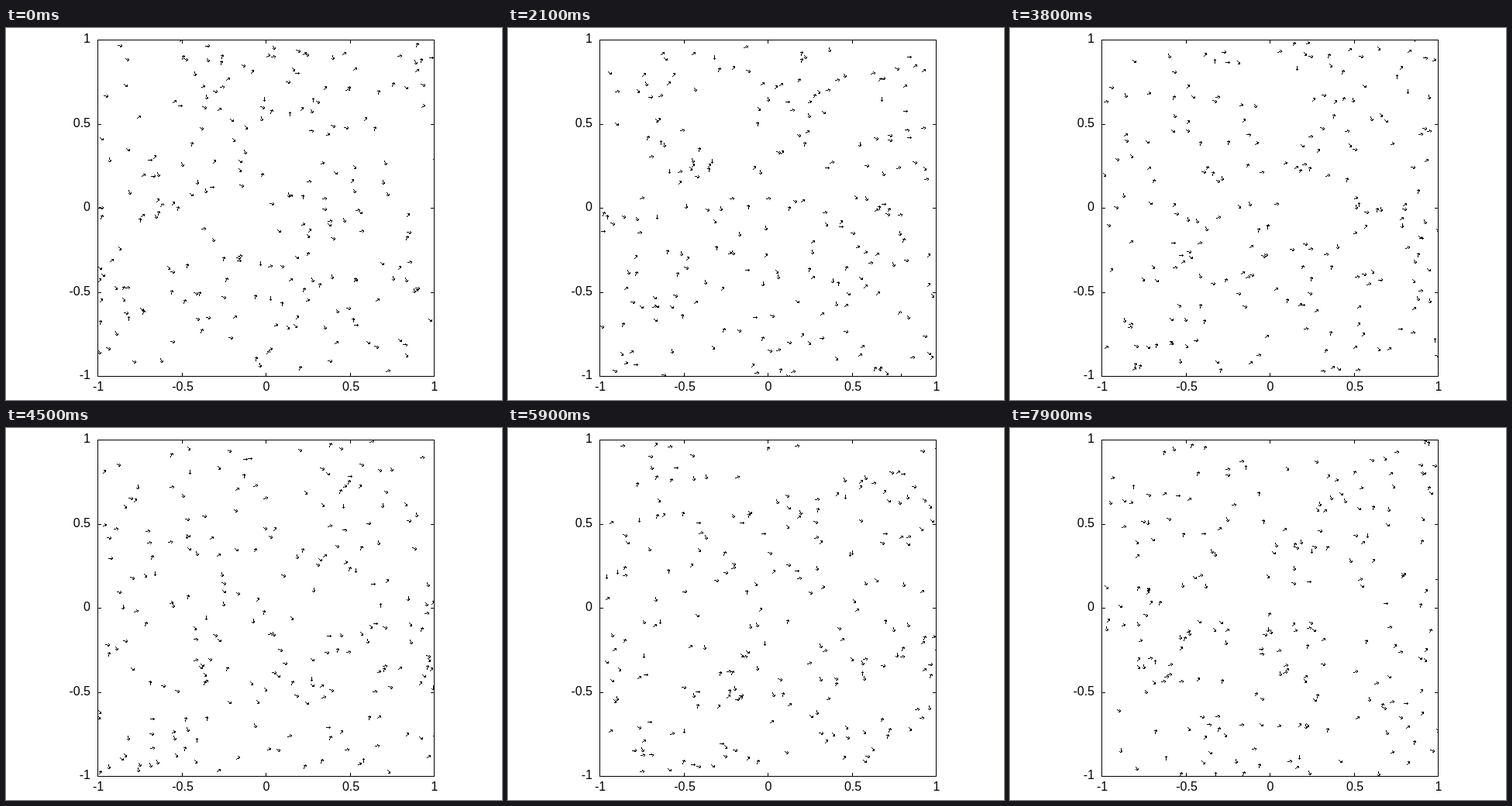
Animation, 640 px wide and 480 px high, one loop 8000 ms. Source, as an HTML page:

```html
<!DOCTYPE html>
<html lang="en">
<head>
<meta charset="utf-8">
<title>Moving particles</title>
<style>
  html, body { margin: 0; width: 100%; height: 100%; overflow: hidden; background: #fff; }
  svg { display: block; }
  path { shape-rendering: crispEdges; }
  #axes { fill: none; stroke: #000; }
  text { font: 16px "Liberation Sans", Arial, sans-serif; }
</style>
</head>
<body>
<svg width="640" height="480" viewBox="0 0 640 480">
  <clipPath id="plot"><rect x="118" y="15" width="435" height="435"/></clipPath>
  <path id="axes"/>
  <g id="labels"></g>
  <path id="arrows" clip-path="url(#plot)"/>
</svg>
<script>
const LEFT = 118, TOP = 15, SIZE = 434, TICK = 5;
const COUNT = 220, STEPS = 80, STEP_MS = 100;
const SPEED = 5, LENGTH = 5, BARB = 2, NOISE = 1;

const get = id => document.getElementById(id);
const wrap = (v, size) => ((v % size) + size) % size;

let seed = 20117;
function random() {
  seed = (seed + 0x6D2B79F5) | 0;
  let t = Math.imul(seed ^ (seed >>> 15), 1 | seed);
  t = (t + Math.imul(t ^ (t >>> 7), 61 | t)) ^ t;
  return ((t ^ (t >>> 14)) >>> 0) / 4294967296;
}

function drawAxes() {
  const right = LEFT + SIZE, bottom = TOP + SIZE;
  let d = `M${LEFT + 0.5} ${TOP + 0.5}h${SIZE}v${SIZE}h${-SIZE}z`;
  let labels = "";
  for (let i = 0; i < 5; i++) {
    const value = i / 2 - 1;
    const x = Math.round(LEFT + i * SIZE / 4);
    const y = Math.round(bottom - i * SIZE / 4);
    if (i % 4) {
      d += `M${x + 0.5} ${TOP}v${TICK}M${x + 0.5} ${bottom + 1}v${-TICK}`;
      d += `M${LEFT} ${y + 0.5}h${TICK}M${right + 1} ${y + 0.5}h${-TICK}`;
    }
    labels += `<text x="${x + 1}" y="468" text-anchor="middle">${value}</text>`;
    labels += `<text x="109" y="${y + 4}" text-anchor="end">${value}</text>`;
  }
  get("axes").setAttribute("d", d);
  get("labels").innerHTML = labels;
}

// A line of whole pixels, without smoothing.
function line([x, y], [x2, y2]) {
  const n = Math.max(Math.abs(x2 - x), Math.abs(y2 - y)) || 1;
  let d = "";
  for (let i = 0; i <= n; i++) {
    const px = Math.round(x + (x2 - x) * i / n);
    const py = Math.round(y + (y2 - y) * i / n);
    d += `M${px} ${py}h1v1h-1z`;
  }
  return d;
}

const reach = ([x, y], angle, length) => [
  Math.round(x + length * Math.cos(angle)),
  Math.round(y - length * Math.sin(angle))
];

function arrow({ x, y, angle }) {
  const tail = [Math.round(LEFT + x), Math.round(TOP + y)];
  const tip = reach(tail, angle, LENGTH);
  const barb = turn => line(tip, reach(tip, angle + turn, BARB));
  return line(tail, tip) + barb(Math.PI * 0.75) + barb(-Math.PI * 0.75);
}

// Headings wander, but always stay in the right-hand half circle.
function move(p) {
  p.angle += (random() - 0.5) * NOISE;
  p.angle = wrap(p.angle + Math.PI / 2, Math.PI) - Math.PI / 2;
  p.x = wrap(p.x + SPEED * Math.cos(p.angle), SIZE);
  p.y = wrap(p.y - SPEED * Math.sin(p.angle), SIZE);
}

const particles = Array.from({ length: COUNT }, () => ({
  x: random() * SIZE,
  y: random() * SIZE,
  angle: (random() - 0.5) * Math.PI
}));
const poses = Array.from({ length: STEPS }, () => {
  const d = particles.map(arrow).join("");
  particles.forEach(move);
  return d;
});

let shown = -1;
const start = performance.now();
function frame() {
  const step = Math.floor((performance.now() - start) / STEP_MS) % STEPS;
  if (step !== shown) get("arrows").setAttribute("d", poses[shown = step]);
  requestAnimationFrame(frame);
}

drawAxes();
frame();
</script>
</body>
</html>
```
